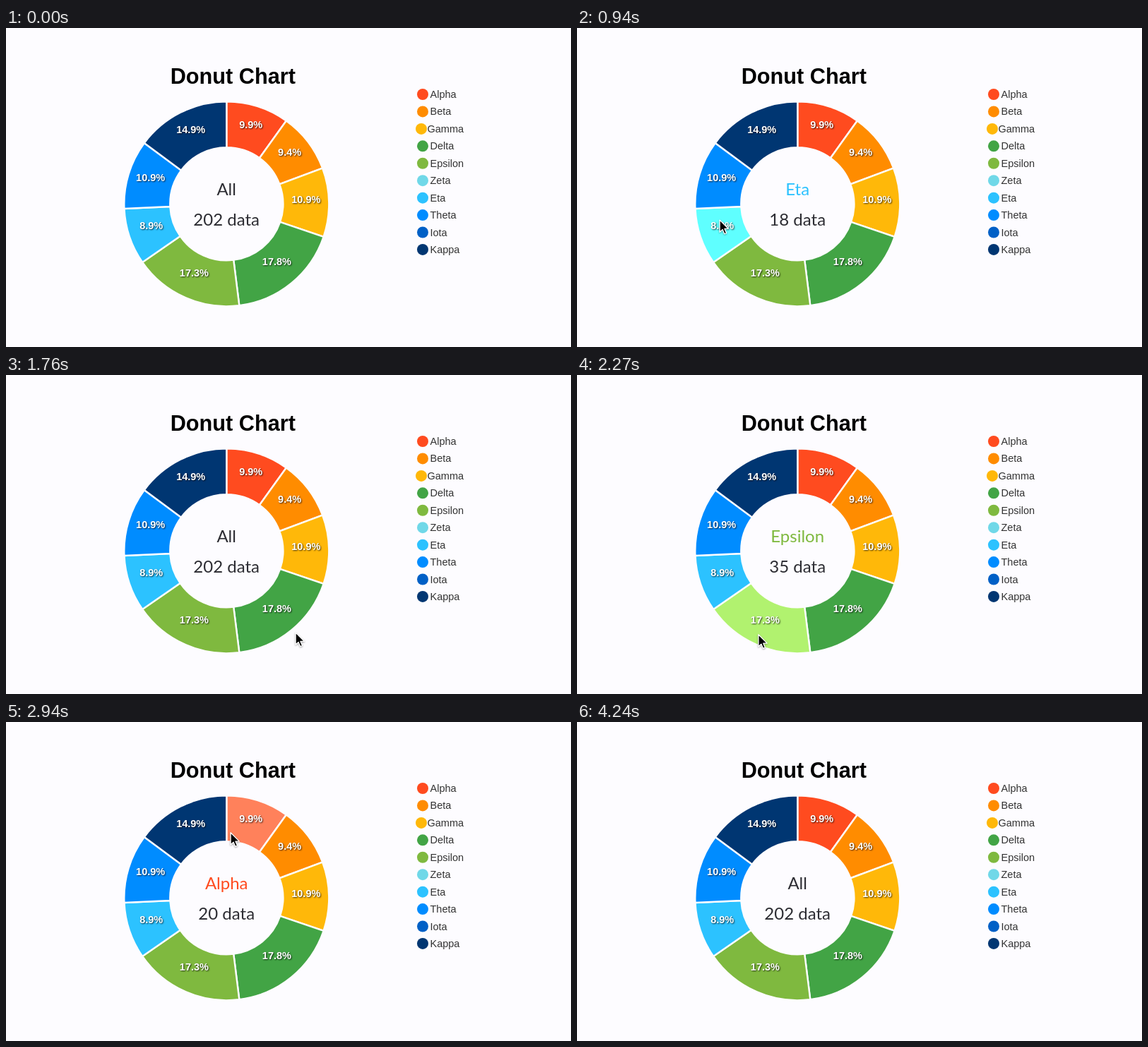
An HTML page for the animation above (4.27 s loop, 800 px wide and 452 px high).

```html
<!DOCTYPE html>
<html lang="en">
<head>
<meta charset="utf-8">
<title>Donut Chart</title>
<style>
  html, body { margin: 0; width: 100%; height: 100%; overflow: hidden; background: #fdfcff; }
  svg { display: block; width: 100vw; height: 100vh; }
  text { font-family: "Liberation Sans", Arial, sans-serif; }
  .title { font-size: 30.7px; font-weight: bold; text-anchor: middle; }
  .legend { font-size: 14.5px; fill: #333; }
  .percent { font-size: 14.5px; font-weight: bold; fill: #fff; text-anchor: middle;
    text-shadow: 1px 1px 2px rgba(0, 0, 0, .75); }
  .center { font: 24px Lato, sans-serif; fill: #2d2d33; text-anchor: middle; }
  #pointer { filter: drop-shadow(0 1px 1px rgba(0, 0, 0, .35)); }
</style>
</head>
<body>
<svg id="stage" viewBox="0 0 800 452">
  <text class="title" x="321.3" y="79">Donut Chart</text>
  <g id="chart"></g>
  <text id="name" class="center" x="312.2" y="236.5"></text>
  <text id="count" class="center" x="312.2" y="280.3"></text>
  <path id="pointer" d="M0 0V17L4 13.4L6.7 19.6L9.5 18.4L6.9 12.3H12.3Z"
    fill="#000" stroke="#fff" stroke-width="1.3" stroke-linejoin="round"/>
</svg>
<script>
const LOOP = 4270;
const CX = 312.3, CY = 249.3, INNER = 80, OUTER = 145;
const TOTAL = 202;
const TEXT_COLOR = '#2d2d33';

// name, count, color, hover color
const series = [
  ['Alpha', 20, '#ff4b1f', '#ff815b'],
  ['Beta', 19, '#ff8c00', '#ffc03a'],
  ['Gamma', 22, '#ffb809', '#ffec45'],
  ['Delta', 36, '#42a445', '#74dc77'],
  ['Epsilon', 35, '#7fb93f', '#b1f26f'],
  ['Zeta', 0, '#70d8e8', '#a6ffff'],
  ['Eta', 18, '#2cc2ff', '#5fffff'],
  ['Theta', 22, '#008cff', '#47c2ff'],
  ['Iota', 0, '#0060c6', '#4692fa'],
  ['Kappa', 30, '#003672', '#4a68a4']
].map(([name, count, color, hover]) => ({ name, count, color, hover }));

// time, x, y of the pointer tip
const route = [
  [85, 304, 8], [180, 296, 66], [330, 276, 142], [580, 222, 198], [940, 202, 272],
  [1350, 292, 314], [1760, 410, 365], [2000, 345, 381], [2270, 257, 368],
  [2620, 284, 262], [2940, 318, 157], [3300, 334, 122], [3600, 346, 23], [3630, 347, 8]
];

const byId = id => document.getElementById(id);
const chart = byId('chart'), pointer = byId('pointer');
const nameText = byId('name'), countText = byId('count');

function add(tag, attrs, text = '') {
  const el = document.createElementNS('http://www.w3.org/2000/svg', tag);
  for (const key in attrs) el.setAttribute(key, attrs[key]);
  el.textContent = text;
  return chart.appendChild(el);
}

function polar(share, radius) {
  const angle = share * 2 * Math.PI;
  return [CX + radius * Math.sin(angle), CY - radius * Math.cos(angle)];
}

function slicePath(from, to) {
  return `M${polar(from, OUTER)}A${OUTER} ${OUTER} 0 0 1 ${polar(to, OUTER)}` +
    `L${polar(to, INNER)}A${INNER} ${INNER} 0 0 0 ${polar(from, INNER)}Z`;
}

function build() {
  let sum = 0;
  series.forEach((item, i) => {
    item.from = sum / TOTAL;
    item.to = (sum += item.count) / TOTAL;
    const shift = item.name === 'Gamma' ? -2 : 0;
    const y = 94 + i * 24.44;
    add('circle', { cx: 590 + shift, cy: y, r: 8, fill: item.color });
    add('text', { class: 'legend', x: 600.5 + shift * 2, y: y + 5 }, item.name);
    if (item.count) {
      item.path = add('path', {
        d: slicePath(item.from, item.to), fill: item.color, stroke: '#fdfcff', 'stroke-width': 2.4
      });
    }
  });
  for (const item of series.filter(s => s.count)) {
    const [x, y] = polar((item.from + item.to) / 2, (INNER + OUTER) / 2);
    add('text', { class: 'percent', x, y }, (item.count / TOTAL * 100).toFixed(1) + '%');
  }
}

function slope(i, axis) {
  const a = route[Math.max(i - 1, 0)], b = route[Math.min(i + 1, route.length - 1)];
  return (b[axis] - a[axis]) / (b[0] - a[0]);
}

// Cubic Hermite curve through the route; null while the pointer is away
function pointerAt(time) {
  const i = route.findIndex(p => p[0] > time) - 1;
  if (i < 0) return null;
  const a = route[i], b = route[i + 1];
  const span = b[0] - a[0], u = (time - a[0]) / span, v = 1 - u;
  return [1, 2].map(k =>
    a[k] * v * v * (1 + 2 * u) + b[k] * u * u * (1 + 2 * v) +
    span * u * v * (slope(i, k) * v - slope(i + 1, k) * u));
}

function sliceAt([x, y]) {
  const dx = x - CX, dy = y - CY, radius = Math.hypot(dx, dy);
  if (radius < INNER || radius > OUTER) return null;
  const share = (Math.atan2(dx, -dy) / (2 * Math.PI) + 1) % 1;
  return series.find(s => share >= s.from && share < s.to);
}

function render(time) {
  const tip = pointerAt(time);
  const active = tip && sliceAt(tip);
  pointer.style.display = tip ? '' : 'none';
  if (tip) pointer.setAttribute('transform', `translate(${tip})`);
  for (const item of series) {
    if (item.path) item.path.setAttribute('fill', item === active ? item.hover : item.color);
  }
  nameText.textContent = active ? active.name : 'All';
  nameText.style.fill = active ? active.color : TEXT_COLOR;
  countText.textContent = `${active ? active.count : TOTAL} data`;
}

build();
const start = performance.now();
function tick() {
  render((performance.now() - start) % LOOP);
  requestAnimationFrame(tick);
}
tick();
</script>
</body>
</html>
```
